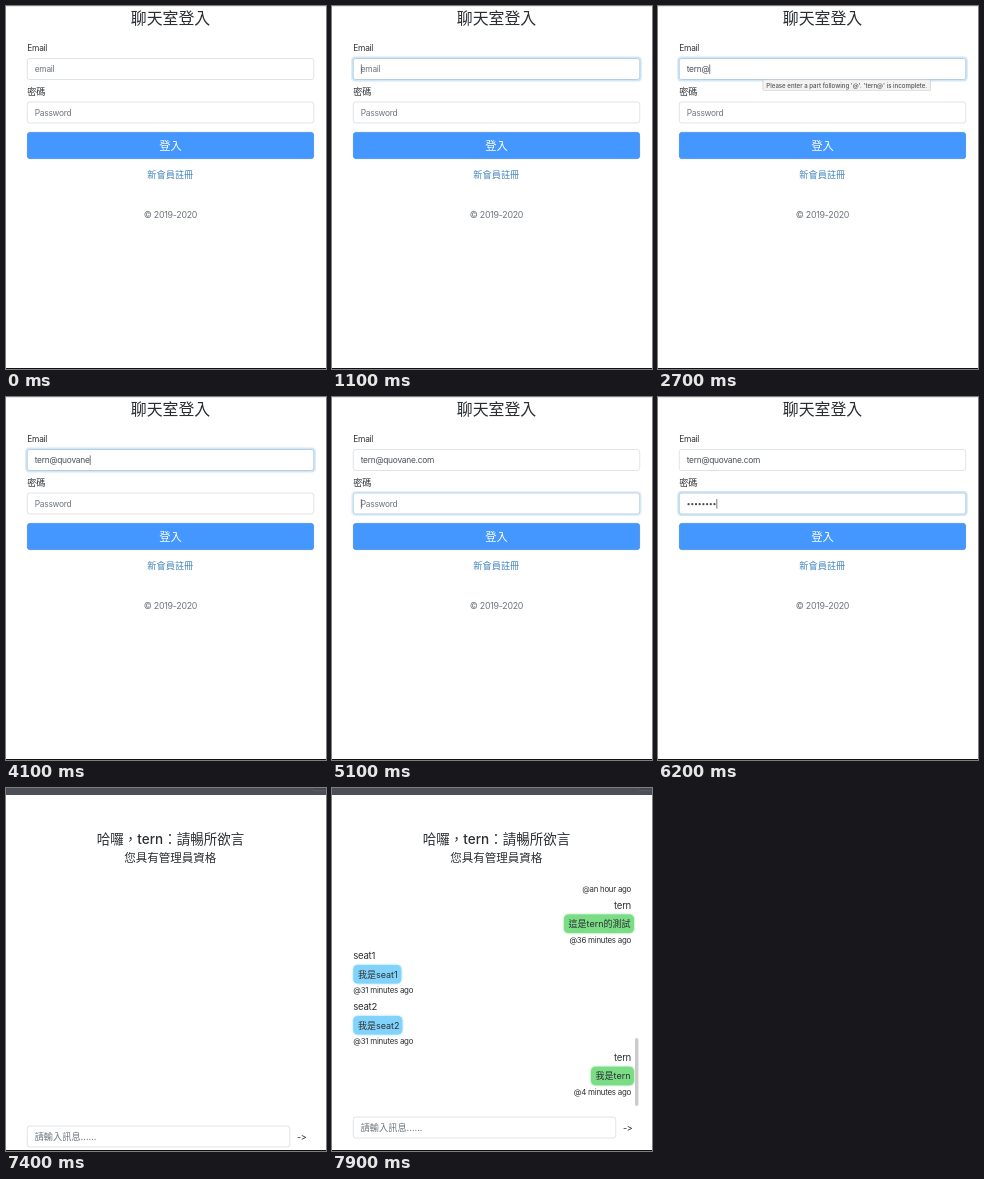
These frames come from a looping animation (320 px wide and 363 px high, 8000 ms). An HTML page:

```html
<!DOCTYPE html>
<html lang="zh-Hant">
<head>
<meta charset="utf-8">
<title>聊天室登入</title>
<style>
html, body { margin: 0; height: 100%; overflow: hidden; background: #fff; }
svg { display: block; width: 100vw; height: 100vh; }
text {
  font: 8.4px Inter, "Noto Sans CJK TC", "Noto Sans CJK", sans-serif;
  letter-spacing: -.031em; fill: #2b2f33; white-space: pre;
}
.cjk { letter-spacing: 0; }
.hint { fill: #6c757d; }
.typed { fill: #495057; }
.tip { letter-spacing: 0; fill: #555; }
</style>
</head>
<body>
<svg id="stage" viewBox="0 0 320 363"></svg>
<script>
const LOOP = 8000, STEP = 100;
const stage = document.getElementById('stage');
const name = 'tern', email = name + '@quovane.com';
const emailKeys = [1900, 2000, 2100, 2200, 2700, 2900, 3100, 3300, 3400, 3500, 3600, 4100, 4400, 4700, 4800, 4900];
const passKeys = [5700, 5900, 5900, 6000, 6000, 6100, 6100, 6200];
// start, end, x, y, text
const tips = [
  [800, 1000, 109, 67, 'Please fill out this field.'],
  [2000, 2200, 91, 82, `Please include an '@' in the email address. '${name.slice(0, 2)}' is missing an '@'.`],
  [2700, 2800, 105, 73.7, `Please enter a part following '@'. '${name}@' is incomplete.`],
  [4400, 4500, 105, 73.7, `'.' is used at a wrong position in 'quovane.'.`]
];

const count = (keys, t) => keys.filter(k => k <= t).length;
const text = (x, y, s, { size = 8.4, anchor = 'start', cls = '', fill = '', weight = 400 } = {}) =>
  `<text x="${x}" y="${y}" class="${cls}" text-anchor="${anchor}" style="font-size:${size}px;font-weight:${weight};${fill && 'fill:' + fill}">${s}</text>`;
const cjk = (x, y, s, size, more) => text(x, y, s, { size, cls: 'cjk', ...more });
const mid = { anchor: 'middle' }, bold = { ...mid, weight: 500 };
const rect = (x, y, w, h, r, attrs) =>
  `<rect x="${x}" y="${y}" width="${w}" height="${h}" rx="${r}" ${attrs}/>`;

function field(y, w, focus = 0) {
  const glow = focus
    ? rect(20.2, y - 1.2, w + 2.1, 23.4, 3.2, `fill="none" stroke="#a5cdee" stroke-opacity="${.5 * focus}" stroke-width="1.8"`)
    : '';
  return glow + rect(21.25, y, w, 21, 2.4,
    `fill="#fff" stroke="${focus ? '#a3c4de' : '#d9dce0'}" stroke-width=".8"`);
}

function login(t) {
  const focusOf = (start, end) => t < start || t >= end ? 0 : t < start + STEP ? .6 : 1;
  const typed = email.slice(0, count(emailKeys, t));
  const dots = count(passKeys, t);
  const fade = t < 6700 ? 1 : t < 6800 ? .82 : .65;
  let out = cjk(164.5, 18, '聊天室登入', 15.9, mid)
    + text(21.3, 45, 'Email')
    + field(52.5, 286.5, focusOf(1000, 5100))
    + text(28.7, 66.2, typed || 'email', { cls: typed ? 'typed' : 'hint' })
    + cjk(21.2, 88.5, '密碼', 9)
    + field(96, 286.5, focusOf(5100, LOOP));
  if (!dots) out += text(28.7, 109.8, 'Password', { cls: 'hint' });
  for (let i = 0; i < dots; i++)
    out += `<circle cx="${30.6 + i * 3.7}" cy="107.2" r="1.15" fill="#495057"/>`;
  return out
    + `<g opacity="${fade}">` + rect(21.4, 126.4, 286.2, 26.2, 2.6, 'fill="#4497ff" stroke="#428ce6" stroke-width=".8"') + '</g>'
    + cjk(164.5, 143.6, '登入', 11.3, { ...bold, fill: '#fff' })
    + cjk(164.3, 172, '新會員註冊', 9.2, { ...bold, fill: '#4286bf' })
    + text(164.5, 212.2, '© 2019-2020', { ...mid, size: 8.85, cls: 'hint' })
    + rect(0, 0, 320, .5, 0, 'fill="#d0d0d0"');
}

function bubble(x, y, w, s, color) {
  return rect(x, y, w, 18.6, 4.6, `fill="${color}" style="filter:drop-shadow(0 0 1px ${color})"`)
    + cjk(x + 4.6, y + 12.6, s, 9);
}

function message(y, who, s, ago, w, mine) {
  const x = mine ? 299 : 21.3, anchor = mine ? 'end' : 'start';
  return text(x, y, who, { size: 9.6, anchor })
    + bubble(mine ? 302 - w : 21.3, y + 6, w, s, mine ? '#7bdc86' : '#82d3fb')
    + text(x, y + 34.4, `@${ago} minutes ago`, { size: 7.9, anchor });
}

function chat(t) {
  const loaded = t >= 7900, y = loaded ? 329 : 338;
  let out = rect(0, 0, 320, 7, 0, 'fill="#4d4f57"')
    + rect(306, -4, 20, 6.5, 2, 'fill="#484a51" stroke="#62646b" stroke-width=".6"')
    + cjk(164.5, 56, `哈囉，${name}：請暢所欲言`, 13.5, bold)
    + cjk(164.3, 73.8, '您具有管理員資格', 11.5, bold);
  if (loaded) out += text(299, 104, '@an hour ago', { size: 7.8, anchor: 'end' })
    + message(120.5, name, `這是${name}的測試`, 36, 70, true)
    + message(171, 'seat1', '我是seat1', 31, 48)
    + message(222, 'seat2', '我是seat2', 31, 49)
    + message(272.7, name, `我是${name}`, 4, 43, true)
    + rect(303, 250, 3.4, 68, 1.7, 'fill="#cbcbcb"');
  return out + field(y, 262.5)
    + cjk(28.7, y + 14.4, '請輸入訊息......', 9.2, { cls: 'cjk hint' })
    + text(291, y + 14, '-&gt;', { size: 9 });
}

// Overlays that depend on the measured width of text already on stage
const add = s => stage.insertAdjacentHTML('beforeend', s);

function drawCaret(t) {
  if (t < 1000) return;
  const inPass = t >= 5100;
  const keys = inPass ? passKeys : emailKeys, n = count(keys, t);
  const since = t - (n ? keys[n - 1] : inPass ? 5000 : 1000);
  if (Math.floor(since / 500) % 2) return;
  const typed = stage.querySelector('.typed');
  const width = inPass ? n * 3.7 : n ? typed.getComputedTextLength() : 0;
  add(rect(28.9 + width, inPass ? 102 : 58.4, .7, 9.6, 0, 'fill="#444"'));
}

function drawTip(t) {
  const tip = tips.find(([start, end]) => t >= start && t < end);
  if (!tip) return;
  const [, , x, y, s] = tip;
  add(text(x + 3.3, y + 7.8, s, { size: 6.1, cls: 'tip', weight: 500 }));
  const label = stage.lastElementChild;
  label.insertAdjacentHTML('beforebegin', rect(x, y, label.getComputedTextLength() + 6.6, 11, 1.4,
    'fill="#f3f3f3" stroke="#d4d4d4" stroke-width=".6" style="filter:drop-shadow(0 .6px .7px #0003)"'));
}

function draw(t) {
  const isLogin = t < 7400;
  stage.innerHTML = (isLogin ? login(t) : chat(t)) + rect(0, 362, 320, 1, 0, 'fill="#111"');
  if (isLogin) {
    drawCaret(t);
    drawTip(t);
  }
}

const begin = performance.now();
let shown = -1;
function tick() {
  const t = Math.floor((performance.now() - begin) % LOOP / STEP) * STEP;
  if (t !== shown) draw(shown = t);
  requestAnimationFrame(tick);
}
tick();
</script>
</body>
</html>
```
